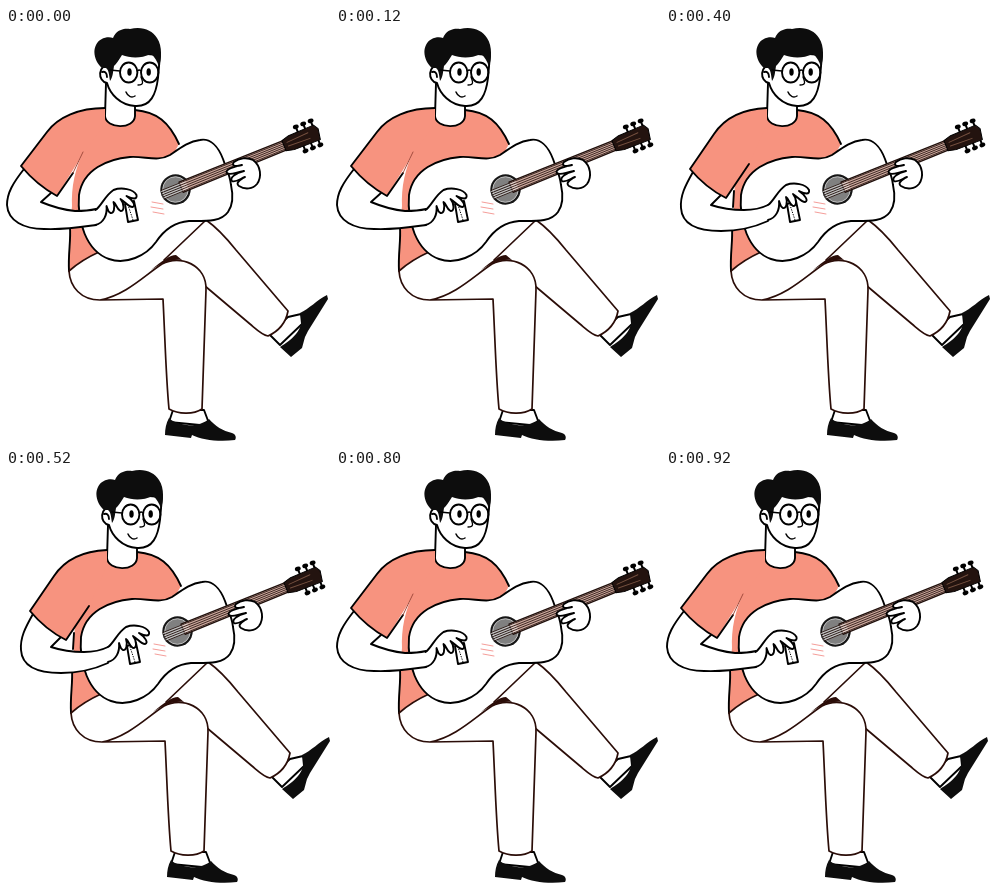
Recreate the animation shown at these times as an HTML page. Size 324 by 414 pixels, loop 1 s.

```html
<!DOCTYPE html>
<html lang="en">
<head>
<meta charset="utf-8">
<title>Guitar player</title>
<style>
html, body { margin: 0; width: 100%; height: 100%; overflow: hidden; background: #fff; }
svg { display: block; width: 100vw; height: 100vh; }
path, circle, ellipse, line { stroke-linecap: round; stroke-linejoin: round; }
.ink { fill: none; stroke: #000; stroke-width: 1.9; }
.skin { fill: #fff; stroke: #000; stroke-width: 1.9; }
.cloth { fill: #f7937f; }
.pants { fill: #fff; stroke: #2b0d08; stroke-width: 1.7; }
.white { fill: #fff; }
.black { fill: #0d0d0d; }

/* 1 s strum: out, middle, in, middle, out */
.sway { animation: sway 1s step-end infinite; }
.out { animation: out 1s step-end infinite; }
.mid { animation: mid 1s step-end infinite; }
.in { animation: in 1s step-end infinite; }
@keyframes sway {
  0%, 80% { transform: translate(-2px, 0); }
  20% { transform: none; }
}
@keyframes out {
  0%, 80% { visibility: visible; }
  20% { visibility: hidden; }
}
@keyframes mid {
  0%, 40%, 80% { visibility: hidden; }
  20%, 60% { visibility: visible; }
}
@keyframes in {
  0%, 60% { visibility: hidden; }
  40% { visibility: visible; }
}
</style>
</head>
<body>
<svg viewBox="0 0 324 414" preserveAspectRatio="none">
<defs>
  <path id="hand" class="skin" d="M97 180C103 176 106 166 115 160C123 157 135 159 138 165C139 170 134 169 128 166C134 170 138 176 134 177C130 177 126 171 122 169C126 174 126 181 122 181C118 179 118 174 115 172C117 178 115 184 112 183C109 182 109 178 108 176C109 185 105 193 97 195"/>
  <g id="peg">
    <path d="M0 -5V-12" stroke="#000" stroke-width="2"/>
    <ellipse cy="-13" rx="3" ry="2.2"/>
  </g>
  <g id="pegs"><use href="#peg" x="135"/><use href="#peg" x="143"/><use href="#peg" x="151"/></g>
</defs>

<g class="sway">
  <!-- torso -->
  <path class="cloth" d="M101 80L131 82C153 84 165 94 175 116L150 160L100 235L65 246C64 226 66 210 66 200L68 178C67 160 71 140 80 122L84 100Z"/>
  <path class="ink" d="M131 82C153 84 165 94 175 116"/>
  <path class="ink" d="M66 200C67 212 64 226 65 243" stroke-width="1.5"/>

  <!-- crossed leg, then standing leg -->
  <path class="skin" d="M265 306L276 317L298 296L297 286L284 289Z" stroke-width="1.4"/>
  <path class="black" d="M323 267C313 272 305 281 296 285C299 293 297 300 292 306C287 312 282 315 276 319L287 329L298 320L301 309L304 303L324 271Z"/>
  <path class="skin" d="M169 382L165 394L206 398L200 382Z" stroke-width="1.4"/>
  <path class="black" d="M165 390C162 395 161 401 161 407L187 410L188 407C198 412 215 414 231 412C233 409 231 406 228 405C219 403 211 398 205 391C199 396 190 398 183 397C176 396 169 394 165 390Z"/>
  <path class="pants" d="M160 232L202 192C215 201 224 212 232 222L284 283C282 294 275 303 264 308C258 307 252 301 246 296L201 258"/>
  <path class="pants" d="M95 224C84 229 74 235 66 243C67 259 77 272 96 272L159 271C161 310 162 350 165 381C174 386 189 387 198 381L202 262C203 236 175 226 158 236L150 200Z" stroke="none" style="stroke:none"/>
  <path class="pants" d="M95 224C84 229 74 235 65 243C66 259 77 272 96 272L159 271C161 310 162 350 165 381C174 386 189 387 198 381L202 262C203 237 176 226 158 236C141 247 122 267 96 272"/>
  <path d="M147 242C158 233 166 227 172 227L178 232C166 231 158 235 147 242Z" fill="#2b0d08"/>

  <!-- guitar body -->
  <path class="skin" d="M219 131C214 118 206 110 196 112C185 113 176 120 166 127C154 134 141 128 126 129C104 131 79 141 75 167C73 193 82 223 105 231C122 237 142 228 152 214C160 202 171 194 185 193C202 193 217 194 224 184C229 177 229 166 227 157C226 147 222 140 219 131Z"/>
  <path d="M148 174L159 176M147 179L159 181M149 184L160 186" fill="none" stroke="#f2847f" stroke-width=".8"/>
  <path class="skin" d="M121 176L130 173L134 192L124 194Z" stroke-width="1.4"/>
  <path d="M124 177L129 192" stroke="#000" stroke-dasharray=".5 2" stroke-width="1"/>

  <!-- neck, strings and head -->
  <g transform="translate(171.5 161.5) rotate(-22)">
    <circle r="15.2" fill="#161616"/>
    <circle r="12.8" fill="#808080" stroke="#ddd" stroke-width=".7"/>
    <path d="M6 -5.5L120 -5V5L6 5.5Z" fill="#cba79c" stroke="#21110d" stroke-width="1.3"/>
    <path d="M-14 -4.5L124 -3.6M-14 -2.2L124 -1.8M-14 0H124M-14 2.2L124 1.8M-14 4.5L124 3.6" stroke="#2e1a16" stroke-width=".8"/>
    <path d="M-14 -3.4H12M-14 -1H12M-14 1.2H12M-14 3.4H12" stroke="#eee" stroke-width=".6"/>
    <use href="#pegs"/>
    <use href="#pegs" transform="scale(1 -1)"/>
    <path d="M117 -5.5L125 -7.5L152 -8L155 -3L153 8L125 7.5L117 5.5Z" fill="#23130f" stroke="#000"/>
    <path d="M121 -2L144 -3M121 2L144 3" stroke="#75503f" stroke-width=".9"/>
  </g>
  <path class="skin" d="M249 132C243 129 235 130 230 134C227 138 231 139 238 137C231 138 220 142 223 145C226 148 232 144 240 143C232 145 225 150 228 153C231 155 236 151 241 149C236 152 231 155 235 158C241 162 249 161 253 156C258 149 257 138 249 132Z"/>

  <!-- neck and head -->
  <path class="skin" d="M102 55L101 88C102 101 130 102 131 88V72Z"/>
  <path class="skin" d="M105 38C94 36 93 53 103 55C106 66 116 77 131 78C147 79 152 66 154 50L156 27L118 24Z"/>
  <path class="ink" d="M98 44C101 43 103 45 103 49" stroke-width="1.2"/>
  <path class="black" d="M98 40C92 35 88 25 92 17C95 10 104 8 109 10C112 2 120 0 126 1C138 -2 148 2 153 10C158 17 158 29 155 39C153 33 151 29 147 26C136 31 126 30 118 27C115 32 112 36 110 38C109 44 109 49 106 53C105 47 105 42 102 40Z"/>
  <g class="ink">
    <ellipse cx="124.7" cy="44.5" rx="8.7" ry="10"/>
    <ellipse cx="145.7" cy="44.5" rx="8.7" ry="10"/>
    <path d="M133.5 43Q135 41 137 43M116 43L106 42" stroke-width="1.5"/>
    <path d="M137 49C139 54 140 57 134 57" stroke-width="1.3"/>
    <path d="M122 64C124 69 128 70 131 68" stroke-width="1.5"/>
  </g>
  <ellipse cx="125.5" cy="44" rx="2.2" ry="3.8"/>
  <ellipse cx="144.7" cy="44" rx="2.2" ry="3.8"/>

  <!-- strumming arm, three poses -->
  <g class="out">
    <path class="white" d="M20 141C9 155 3 165 3 177C4 193 20 201 40 201C60 202 78 199 92 197L94 181L71 183C58 182 46 177 37 174L50 167Z"/>
    <path class="ink" d="M20 141C9 155 3 165 3 177C4 193 20 201 40 201C60 202 78 199 92 197M47 165L37 174C49 179 60 182 71 183C80 183 88 182 92 181"/>
    <use href="#hand" transform="translate(-5.5 2)"/>
    <path class="cloth" d="M101 80C75 80 54 89 43 104L17 138C27 150 40 161 53 168L80 124L101 96Z"/>
    <path class="ink" d="M101 80C75 80 54 89 43 104L17 138C27 150 40 161 53 168L69 145"/>
    <path d="M69 145L79 124" fill="none" stroke="#a34b3d"/>
  </g>
  <g class="mid">
    <path class="white" d="M23 140C14 154 8 166 9 178C10 196 22 203 42 203C65 203 84 199 97 195L98 180L72 183C60 182 48 179 40 176L54 168Z"/>
    <path class="ink" d="M23 140C14 154 8 166 9 178C10 196 22 203 42 203C65 203 84 199 97 195M50 166L40 176C50 180 62 183 73 183C83 183 91 182 97 180"/>
    <use href="#hand"/>
    <path class="cloth" d="M101 80C74 81 56 90 45 105L20 139C30 151 41 162 54 169L79 135L101 96Z"/>
    <path class="ink" d="M101 80C74 81 56 90 45 105L20 139C30 151 41 162 54 169L79 135"/>
  </g>
  <g class="in">
    <path class="white" d="M27 144C19 158 14 168 15 180C16 196 30 203 55 203C75 203 91 198 102 193L103 177L78 182C65 182 54 180 45 177L59 169Z"/>
    <path class="ink" d="M27 144C19 158 14 168 15 180C16 196 30 203 55 203C75 203 91 198 102 193M55 167L45 177C54 180 66 182 78 182C88 182 96 180 102 177"/>
    <use href="#hand" transform="translate(5 -3)"/>
    <path class="cloth" d="M101 80C76 81 58 91 48 106L24 141C34 153 46 163 60 170L83 136L101 96Z"/>
    <path class="ink" d="M101 80C76 81 58 91 48 106L24 141C34 153 46 163 60 170L83 136"/>
    <path class="ink" d="M68 163L67 179" stroke-width="1.4"/>
  </g>
</g>
</svg>
</body>
</html>
```
